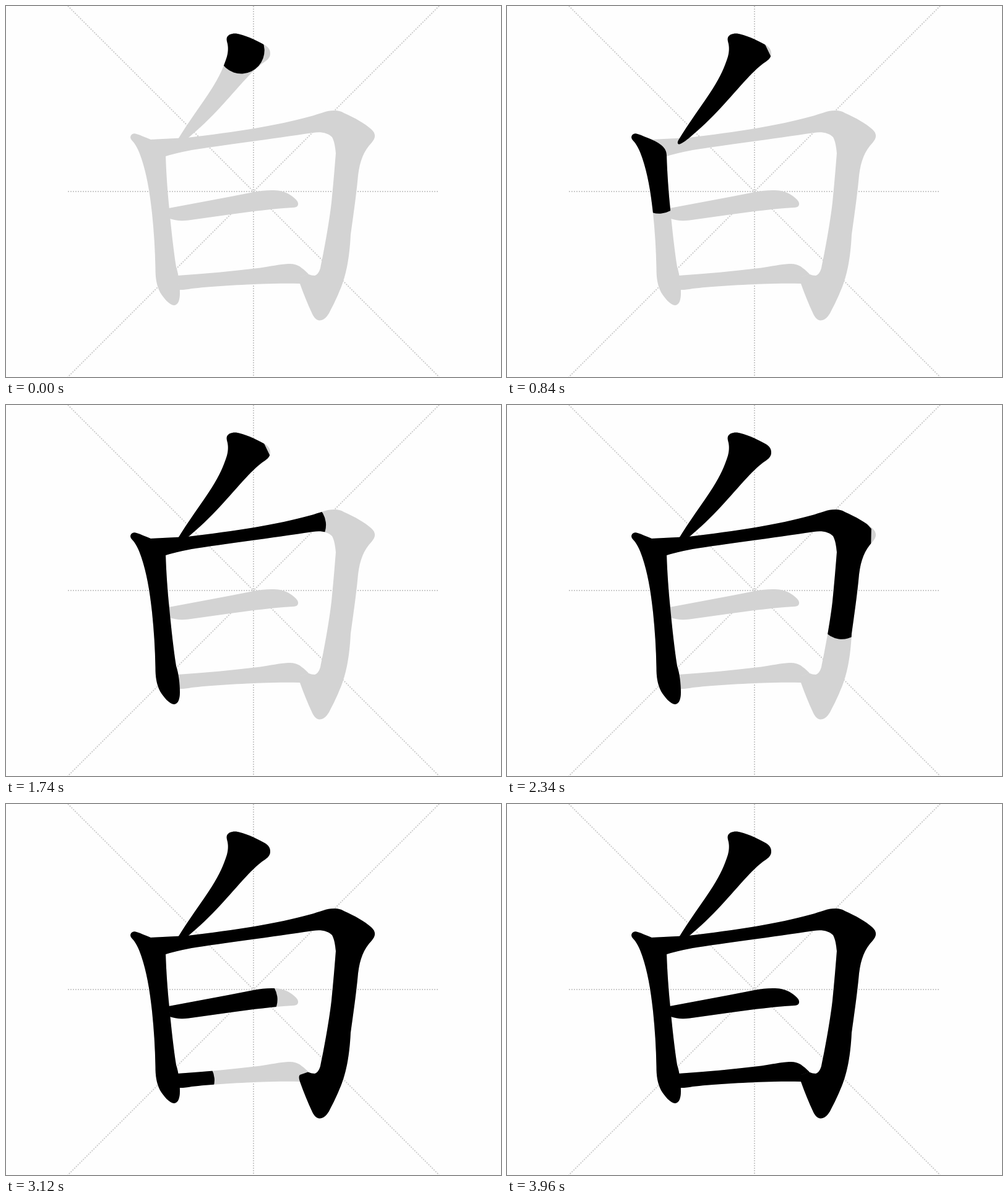
An HTML page with a canvas that plays this animation: 800x600 px, repeating every 4080 ms.

```html
<!DOCTYPE html>
<html lang="zh">
<head>
<meta charset="utf-8">
<title>白</title>
<style>
html, body { margin: 0; width: 100%; height: 100%; overflow: hidden; background: #fefefe; }
canvas { display: block; }
</style>
</head>
<body>
<canvas id="stage" width="800" height="600"></canvas>
<script>
const ctx = document.getElementById('stage').getContext('2d');
const LOOP = 4080, STEP = 60, LAST = 3960, BRUSH = 75;

// shape: outline; spine: brush path; start in ms; speed in px per second; full: outline filled from here
const strokes = [
  {
    shape: 'M357 51C359 46 365 44 372 44.5C384 46 404 55 418 63C425 67 427.5 72 427 78C426.5 85 420 89 414 93' +
      'C396 106 372 136 347 163C328 184 312 198 296 212C289 218 283 222 279 223.5C275.5 224 275 221 277 217' +
      'C293 190 317 158 333 133C345 114 352 98 357 82C359.5 73 359 66 358 61C357 57 356 54 357 51Z',
    spine: [[371, 53], [386, 84], [277, 222]],
    start: -115, speed: 184, full: 1920
  },
  {
    shape: 'M201 212C202 207 206 205 211 207C218 209 226 213 234 216C247 222 258 229 258 241C259 272 261 300 264 329' +
      'C267 361 271 397 275 422C279 434 281 450 281 465C281 476 278 484 271 484C264 483 255 473 249 463' +
      'C243 451 241.5 439 241.5 425C241 394 239 364 236 335C232 298 227 271 219 247C214 232 209 223 204 218Q201 215 201 212Z',
    spine: [[212, 214], [232, 238], [246, 298], [258, 420], [268, 470]],
    start: 452, speed: 240, full: 2100
  },
  {
    shape: 'M233 216L293 213C370 204 440 193 490 179C509 174 517 169 531 169C537 169 541 170 546 173' +
      'C564 181 580 190 590 199C599 207 597 214 591 221C578 235 572 250 569 274C566 307 561 341 557 370' +
      'C555 410 549 438 539 461C533 476 527 487 522 497C517 505 512 508.5 507 508.5C501 508 498 504 495 498' +
      'C488 483 481 466 475 449Q472 441 475 438L488 433.5Q494 436 499 436C504 434 506 430 508 424' +
      'C514 396 522 352 526 318C529 288 531 264 533 238C532 228 531 220 527 212C520 205 509 203 496 205' +
      'C430 215 350 225 300 233Q274 238 258 243L246 238Z',
    spine: [[236, 230], [300, 223], [420, 206], [479.5, 194], [528, 188], [551, 214], [550, 260],
      [541.5, 341], [533, 400], [508, 469]],
    start: 1040, speed: 352, full: 2940
  },
  {
    shape: 'M263 327L359 309L400 301C415 298 432 297 443 299C456 302 465 308 471 316C474 322 471 326 464 326' +
      'C432 328 398 332 363 337L295 346.5C283 348 273 347 265 344Z',
    spine: [[272, 336], [326.5, 327], [425, 313], [460, 317]],
    start: 2394, speed: 180, full: 3600
  },
  {
    shape: 'M277 436C322 433 366 429 411 423.5C428 421 441 418 456 417C470 416 476 422 481 426L489 433.5' +
      'L476 438L476 449C450 448.5 430 449 414 449.5C370 451 326 454 300 457Q287 459.5 280 459Z',
    spine: [[284, 448], [377, 440], [450, 432], [478, 438]],
    start: 3036, speed: 185, full: LOOP
  }
];
for (const s of strokes) s.outline = new Path2D(s.shape);

function trace(points) {
  ctx.beginPath();
  points.forEach(p => ctx.lineTo(p[0], p[1]));
}

function drawGrid() {
  ctx.save();
  ctx.strokeStyle = '#ccc';
  ctx.lineWidth = 2;
  ctx.setLineDash([2, 2]);
  const lines = [
    [[100, 0], [700, 600]], [[700, 0], [100, 600]],
    [[400, 0], [400, 600]], [[100, 300], [700, 300]]
  ];
  for (const line of lines) {
    trace(line);
    ctx.stroke();
  }
  ctx.restore();
}

function drawStroke(s, t) {
  if (t < s.start) return;
  if (t >= s.full) {
    ctx.fill(s.outline);
    return;
  }
  ctx.save();
  ctx.clip(s.outline);
  ctx.lineWidth = BRUSH;
  ctx.lineCap = 'round';
  ctx.setLineDash([Math.max(0.1, (t - s.start) * s.speed / 1000), 2000]);
  trace(s.spine);
  ctx.stroke();
  ctx.restore();
}

function draw(t) {
  ctx.fillStyle = '#fefefe';
  ctx.fillRect(0, 0, 800, 600);
  drawGrid();
  ctx.fillStyle = '#d3d3d3';
  for (const s of strokes) ctx.fill(s.outline);
  ctx.fillStyle = ctx.strokeStyle = '#000';
  for (const s of strokes) drawStroke(s, t);
}

const begin = performance.now();
function tick() {
  const t = (performance.now() - begin) % LOOP;
  draw(Math.min(LAST, Math.floor(t / STEP) * STEP));
  requestAnimationFrame(tick);
}
tick();
</script>
</body>
</html>
```
